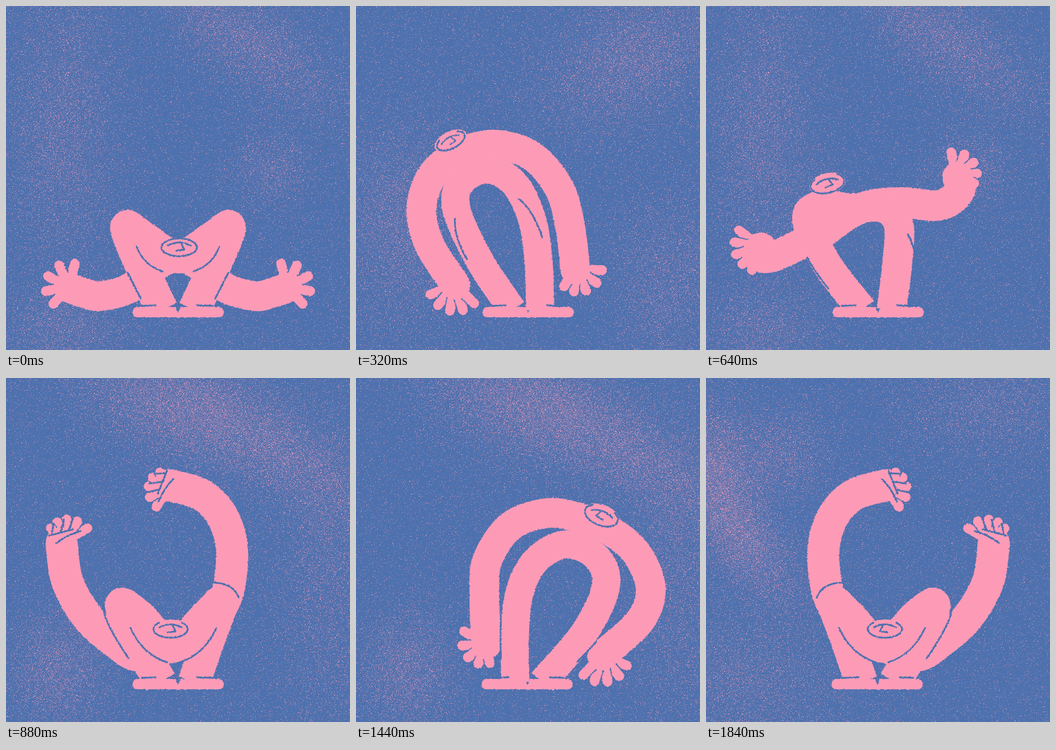
Recreate the animation shown at these times as an HTML page with a canvas. Size 600 by 600 pixels, loop 1920 ms.

```html
<!DOCTYPE html>
<html lang="en">
<head>
<meta charset="utf-8">
<title>Dancing figure</title>
<style>
  html, body { margin: 0; width: 100%; height: 100%; overflow: hidden; background: #4d71ae; }
  canvas, svg { position: absolute; left: 0; top: 0; width: 600px; height: 600px; }
  path, ellipse { stroke-linecap: round; stroke-linejoin: round; fill: none; }
  .pink { stroke: #fd9bb7; }
  .line { stroke: #4d71ae; stroke-width: 3; }
  .fill { fill: #fd9bb7; }
</style>
</head>
<body>
<canvas width="600" height="600"></canvas>
<svg viewBox="0 0 600 600">
  <filter id="rough" filterUnits="userSpaceOnUse" x="0" y="0" width="600" height="600" color-interpolation-filters="sRGB">
    <feTurbulence type="fractalNoise" baseFrequency=".35" numOctaves="1" seed="4"/>
    <feDisplacementMap in="SourceGraphic" scale="3.5" xChannelSelector="R" yChannelSelector="G"/>
  </filter>
  <g filter="url(#rough)"><g id="figure"></g></g>
</svg>
<script>
const STEP = 80, HALF = 12, SIZE = 600;
const ctx = document.querySelector('canvas').getContext('2d');
const figure = document.getElementById('figure');

// Completes a left half with its reflection in x = sum / 2.
function mirror(half, mid = [], sum = SIZE) {
  const right = [];
  for (let i = half.length - 2; i >= 0; i -= 2) right.push(sum - half[i], half[i + 1]);
  return [...half, ...mid, ...right];
}

// Poses keyed by step within half a loop; the other half is mirrored.
const legs = {
  0: mirror([272,530, 240,462, 210,387, 240,404], [300,438]),
  2: [272,530, 233,448, 187,345, 190,299, 226,280, 266,300, 299,366, 315,445, 321,530],
  6: [274,530, 200,443, 163,362, 180,312, 232,290, 285,318, 314,375, 322,450, 321,530],
  11: [270,530, 232,466, 201,397, 231,414, 291,468, 350,414, 376,392, 354,455, 328,530]
};
const arms = {
  0: mirror([109,491, 135,500, 165,506, 216,492, 255,458], [300,437]),
  2: [176,488, 153,410, 143,345, 150,295, 171,265, 203,250, 240,250, 290,269, 339,318, 371,385, 393,455],
  6: [170,484, 104,424, 85,368, 108,308, 155,267, 212,243, 268,236, 330,259, 370,318, 375,380, 372,465],
  9: [70,400, 85,440, 125,462, 180,455, 225,437, 262,405, 300,385, 350,372, 420,358, 465,305, 462,240],
  11: [97,288, 107,355, 143,418, 190,460, 232,484, 290,465, 372,405, 394,325, 384,255, 345,206, 285,187]
};
// Thumb angle, angle between fingers, thumb length, change per finger.
const handL = { 0: [-75,-38,43,-1], 2: [-201,-29,46,0], 6: [-202,-28,47,0], 11: [-30,-24,52,-5] };
const handR = { 0: [-105,38,43,-1], 2: [32,29,49,-3], 6: [-31,33,45,-3], 11: [-239,28,44,-4] };
// Centre, radii, tilt, width of the rim outside the ring.
const head = {
  0: [302,421, 31,15.5, 0, 1.5],
  2: [160,231, 23,9, -33, 5.5],
  6: [171,240, 30,17, -21, 2],
  11: [287,438, 30,15, 0, 2]
};
const widths = { 0: [57,52], 2: [49,52], 6: [49,52], 11: [57,56] };
const creases = {
  0: mirror([212,465, 224,488, 235,510]),
  2: [165,281, 146,330, 174,388, 304,318, 270,256, 222,253],
  6: [180,460, 196,478, 213,495, 346,490, 348,455, 346,420],
  11: [170,400, 170,425, 214,489, 406,383, 396,358, 363,357]
};
const thighs = {
  0: mirror([228,420, 240,452, 273,463]),
  11: mirror([217,436, 238,482, 281,496], [], 584)
};
const FIST = 'M-22-13L20-24M-2-18L4-41M12-22L20-43M-17-16L-14-34M-9 0Q8-14 33-21';

function pose(track, k) {
  const keys = Object.keys(track).map(Number);
  const b = keys.find(n => n >= k), a = keys.filter(n => n <= k).pop();
  if (a === b) return track[a];
  const t = (k - a) / (b - a), e = t * t * (3 - 2 * t);
  return track[a].map((v, i) => v + (track[b][i] - v) * e);
}

function spline(p) {
  const n = p.length / 2;
  const at = (i, c) => p[2 * Math.max(0, Math.min(n - 1, i)) + c];
  let d = `M${p[0]} ${p[1]}`;
  for (let i = 0; i < n - 1; i++) {
    const out = [0, 1].map(c => at(i, c) + (at(i + 1, c) - at(i - 1, c)) / 6);
    const into = [0, 1].map(c => at(i + 1, c) - (at(i + 2, c) - at(i, c)) / 6);
    d += `C${out} ${into} ${at(i + 1, 0)} ${at(i + 1, 1)}`;
  }
  return d;
}

const stroke = (d, w) => `<path class="pink" d="${d}" stroke-width="${w}"/>`;
const line = (d, extra = '') => `<path class="line" d="${d}" ${extra}/>`;
const curves = p => `M${p.slice(0, 2)}Q${p.slice(2, 6)}M${p.slice(6, 8)}Q${p.slice(8)}`;

function hand(x, y, [start, gap, length, taper]) {
  let s = '';
  for (let i = 0; i < 5; i++) {
    const a = (start + i * gap) * Math.PI / 180, r = length + i * taper;
    const d = `M${x} ${y}l${r * Math.cos(a)} ${r * Math.sin(a)}`;
    s += line(d, 'style="stroke-width:21"') + stroke(d, 17);
  }
  return s;
}

function face(k) {
  const [x, y, rx, ry, tilt, rim] = pose(head, k);
  const gap = k > 2 ? 'pathLength="100" stroke-dasharray="61 28 11 0"' : '';
  return `<g transform="translate(${x} ${y}) rotate(${tilt})">
    <ellipse class="fill" rx="${rx + rim}" ry="${ry + rim}"/>
    <ellipse class="line" rx="${rx}" ry="${ry}" ${gap}/>
    <g transform="scale(${rx / 31})">${line('M-20-3Q0-14 20-3M3-8L9 4L-5 6')}</g></g>`;
}

function drawFigure(k) {
  const arm = pose(arms, k), [legW, armW] = pose(widths, k);
  const [lx, ly] = arm, [rx, ry] = arm.slice(-2);
  let s = hand(lx, ly, pose(handL, k)) + hand(rx, ry, pose(handR, k));
  s += stroke(spline(arm), armW);
  s += `<path class="pink" style="stroke-linecap:butt" d="${spline(pose(legs, k))}" stroke-width="${legW}"/>`;
  s += '<path class="fill" d="M300 536L296 525H231Q221 525 221 534T231 543H370Q380 543 380 534T370 525H304Z"/>';
  s += line('M237 523L261 522M333 522L361 523') + line(curves(pose(creases, k)));
  if (k === 0 || k > 9) s += line(curves(pose(thighs, k)));
  if (k > 9) {
    s += line(FIST, `transform="translate(${lx} ${ly})"`);
    s += line(FIST, `transform="translate(${rx + 6} ${ry - 2}) rotate(-83) scale(-1 1)"`);
  }
  return s + face(k);
}

// Clouds of grain: x, y, radii, angle, density.
const clouds = [
  [[420,60,170,60,35,.3], [100,200,80,220,0,.22], [460,280,60,60,0,.2], [100,560,90,60,0,.2]],
  [[300,50,160,80,20,.4], [480,130,160,60,35,.26], [560,350,80,240,0,.16], [90,510,70,90,0,.28]],
  [[480,90,150,90,-30,.3], [80,380,90,160,0,.24], [540,480,80,140,0,.2]],
  [[10,150,60,110,-20,.45], [70,290,110,55,50,.4], [130,130,75,70,0,.24],
   [500,50,150,80,0,.17], [60,520,150,100,0,.18]]
];

let seed = 7;
function random() {
  seed = (Math.imul(seed, 1664525) + 1013904223) >>> 0;
  return seed / 4294967296;
}

function grain(list) {
  const img = ctx.createImageData(SIZE, SIZE);
  const shapes = list.map(([x, y, a, b, deg, s]) => {
    const r = deg * Math.PI / 180;
    return [x, y, Math.cos(r), Math.sin(r), a, b, s];
  });
  for (let y = 0, i = 0; y < SIZE; y++) for (let x = 0; x < SIZE; x++, i += 4) {
    let d = .07;
    for (const [cx, cy, c, s, a, b, w] of shapes) {
      const u = ((x - cx) * c + (y - cy) * s) / a, v = ((y - cy) * c - (x - cx) * s) / b;
      d += w * Math.exp(-u * u - v * v);
    }
    const hit = random() < d * 1.25, shade = random();
    const m = hit ? .12 + .8 * shade ** 4 + .2 * shade : 0;
    img.data[i] = 77 + 176 * m;
    img.data[i + 1] = 113 + 42 * m;
    img.data[i + 2] = 174 + 9 * m;
    img.data[i + 3] = 255;
  }
  return img;
}
const textures = clouds.map(grain);

let shown = -1;
function tick() {
  const step = Math.floor(performance.now() / STEP) % (2 * HALF);
  if (step !== shown) {
    shown = step;
    ctx.putImageData(textures[(step >> 1) % 4], 0, 0);
    figure.setAttribute('transform', step < HALF ? '' : 'translate(599 0) scale(-1 1)');
    figure.innerHTML = drawFigure(step % HALF);
  }
  requestAnimationFrame(tick);
}
tick();
</script>
</body>
</html>
```
